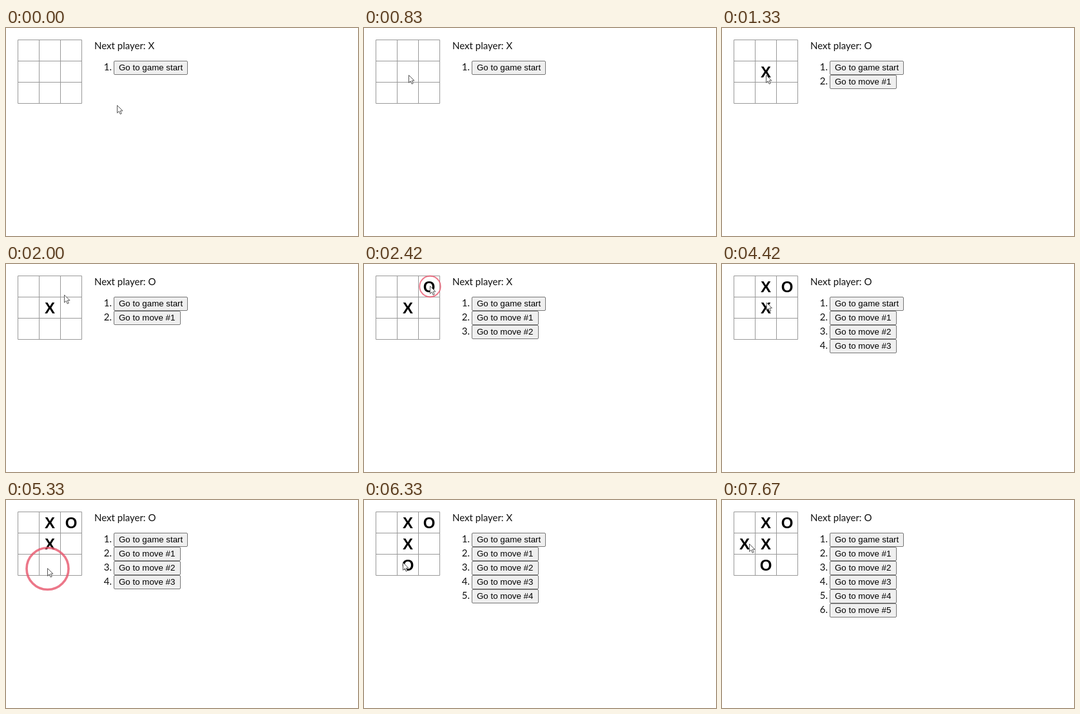
Recreate the animation shown at these times as an HTML page. Size 546 by 324 pixels, loop 8000 ms.

```html
<!DOCTYPE html>
<html lang="en">
<head>
<meta charset="utf-8">
<title>Tic-tac-toe with move history</title>
<style>
  html, body { margin: 0; width: 100%; height: 100%; overflow: hidden; background: #fff; }
  svg { display: block; }
  .label { font: 15px Lato, sans-serif; fill: #111; }
  .number { text-anchor: end; }
  .caption { font: 13.333px "Liberation Sans", Arial, sans-serif; fill: #000; }
  .mark { font: bold 24px "Liberation Sans", Arial, sans-serif; text-anchor: middle; }
  .button { fill: #efefef; stroke: #767676; }
</style>
</head>
<body>
<svg width="546" height="324" viewBox="0 0 546 324">
  <path d="M18.5 18.5h99v99h-99zM51.5 18v100M84.5 18v100M18 51.5h100M18 84.5h100" fill="none" stroke="#999"/>
  <text id="status" class="label" x="137" y="33"></text>
  <g id="history"></g>
  <g id="marks"></g>
  <circle id="ring" fill="none" stroke="#e8566c" stroke-opacity=".8"/>
  <path id="cursor" d="M.5 .5V12.3L3.3 9.7L5.2 14.2L7.2 13.3L5.3 9H9Z" fill="#fff" stroke="#444" stroke-width=".9"/>
</svg>
<script>
const LOOP = 8000, FRAME = 250 / 3;

const clicks = [
  { at: 9, col: 1, row: 1 },
  { at: 23, col: 2, row: 0 },
  { at: 37, col: 1, row: 0 },
  { at: 53, col: 1, row: 2 },
  { at: 73, col: 0, row: 1 }
];
const path = [
  [0, 172, 120], [2, 172, 120], [7, 70, 73], [9, 68, 73],
  [17, 68, 73], [22, 102, 34], [27, 102, 34], [32, 70, 34],
  [42, 70, 34], [47, 66, 107], [52, 64, 106], [62, 64, 106],
  [63, 60, 97], [66, 44, 71], [67, 44, 71], [69, 42, 68], [80, 42, 68]
];

const $ = id => document.getElementById(id);
const player = i => i % 2 ? "O" : "X";

function add(parent, tag, attrs, text = "") {
  const el = document.createElementNS("http://www.w3.org/2000/svg", tag);
  for (const key in attrs) el.setAttribute(key, attrs[key]);
  el.textContent = text;
  return parent.appendChild(el);
}

const rows = [0, ...clicks].map((_, i) => {
  const row = add($("history"), "g", { transform: `translate(0 ${22 * i})` });
  add(row, "text", { class: "label number", x: 164, y: 66 }, `${i + 1}.`);
  add(row, "rect", { class: "button", x: 167.5, y: 51.5, width: i ? 103 : 114, height: 21, rx: 1.5 });
  add(row, "text", { class: "caption", x: 175, y: 66 }, i ? `Go to move #${i}` : "Go to game start");
  return row;
});
const marks = clicks.map(({ col, row }, i) =>
  add($("marks"), "text", { class: "mark", x: 68 + 33 * (col - 1), y: 44 + 33 * row }, player(i)));

const show = (el, on) => el.setAttribute("visibility", on ? "visible" : "hidden");

function cursorAt(step) {
  const i = Math.max(1, path.findIndex(p => p[0] >= step));
  const [t0, x0, y0] = path[i - 1], [t1, x1, y1] = path[i];
  const p = (step - t0) / (t1 - t0), e = p * p * (3 - 2 * p);
  return [x0 + (x1 - x0) * e, y0 + (y1 - y0) * e];
}

function draw(time) {
  // Twelve frames per second, with every sixth one repeating its predecessor.
  const frame = Math.floor((time % LOOP + 5) / FRAME);
  const step = Math.min(79, frame - Math.floor((frame + 3) / 6));
  const moves = clicks.filter(c => step > c.at).length;
  const [x, y] = cursorAt(step);

  $("status").textContent = `Next player: ${player(moves)}`;
  rows.forEach((row, i) => show(row, i <= moves));
  marks.forEach((mark, i) => show(mark, i < moves));
  $("cursor").setAttribute("transform", `translate(${x} ${y})`);

  // The ring halves in size as the click lands, then vanishes.
  const press = clicks.find(c => step === c.at || step === c.at + 1);
  show($("ring"), press);
  if (press) {
    const size = step === press.at ? 1 : 0.5;
    const ring = { cx: x + 0.5, cy: y + 1, r: 32.5 * size, "stroke-width": 3.6 * size };
    for (const key in ring) $("ring").setAttribute(key, ring[key]);
  }
}

const start = performance.now();
(function tick() {
  draw(performance.now() - start);
  requestAnimationFrame(tick);
})();
</script>
</body>
</html>
```
